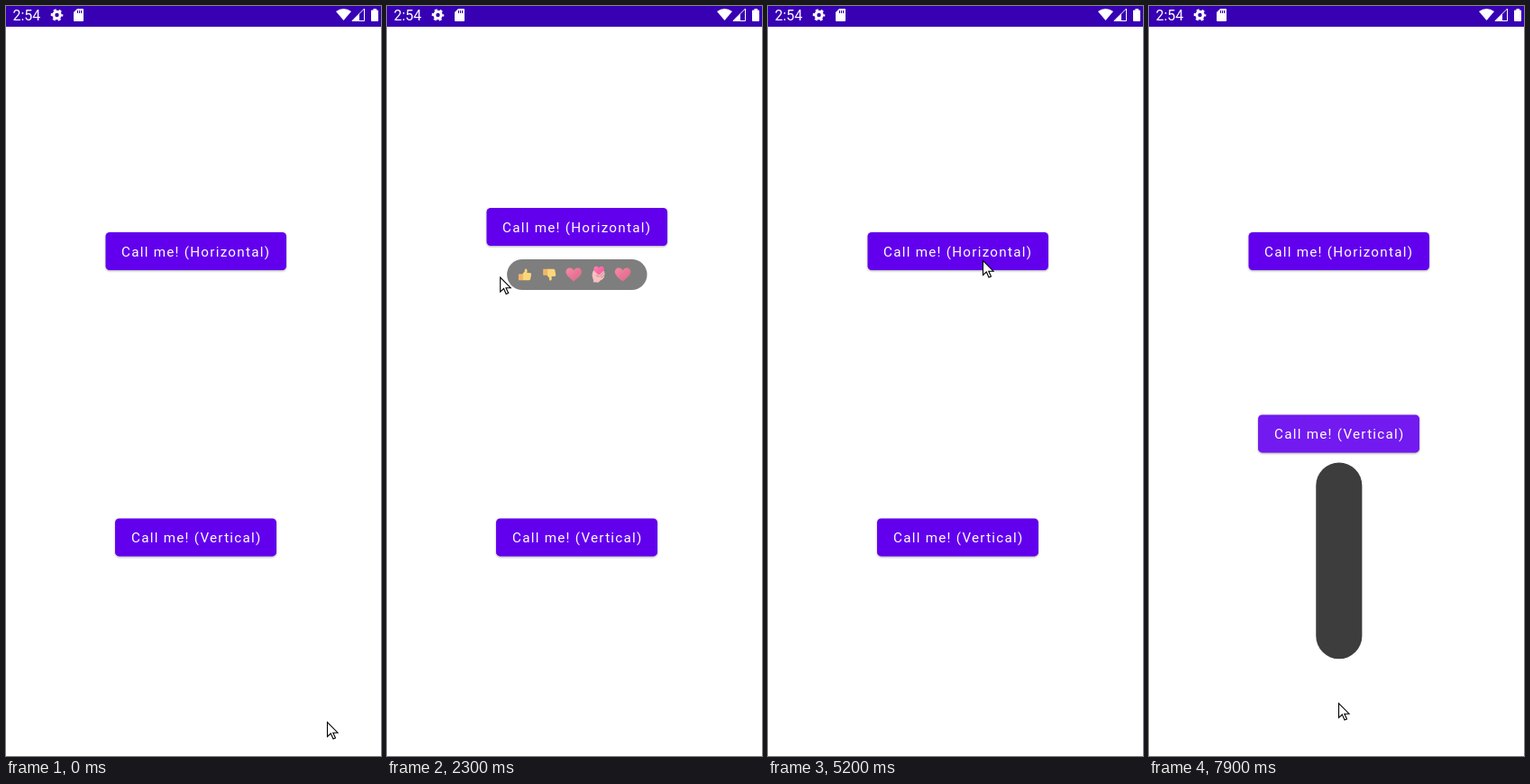
Write an HTML page that moves like this. It is 416 px wide and 832 px high and loops after 8 s.

```html
<!DOCTYPE html>
<html lang="en">
<head>
<meta charset="utf-8">
<style>
  html, body { margin: 0; width: 100%; height: 100%; overflow: hidden; background: #fff; }
  svg { display: block; width: 100%; height: 100%; }
  text { font-family: Roboto, sans-serif; fill: #fff; white-space: pre; }
  .label { font-size: 15.2px; letter-spacing: 1.27px; }
  .button { fill: #6200ee; filter: drop-shadow(0 1.5px 1.2px #0005); }
</style>
</head>
<body>
<svg viewBox="0 0 416 832">
  <defs>
    <linearGradient id="rose" x1="0" y1="0" x2="1" y2="1">
      <stop offset="0" stop-color="#f04a70"/>
      <stop offset=".5" stop-color="#de2559"/>
      <stop offset="1" stop-color="#b51548"/>
    </linearGradient>
    <g id="thumb">
      <path fill="#f28a0c" d="M-11 0Q-11-1-10-1H-4V10H-10Q-11 10-11 9Z"/>
      <path fill="#fcbf29" d="M-4-1 0-6V-9Q1-11 3-10Q5-9 4-3H9Q12-3 11.5 0L10 8Q9.500 10 7 10H-4Z"/>
    </g>
    <g id="thumbDown"><use href="#thumb" transform="scale(1 -1)"/></g>
    <path id="heart" fill="url(#rose)" d="M0 12C-6 7-14 2-14-5C-14-9-11-12-7-12C-4-12-1-10 0-7C1-10 4-12 7-12C11-12 14-9 14-5C14 2 6 7 0 12Z"/>
    <g id="handHeart">
      <path fill="#f59c9c" d="M-11 1Q-11-5-8-8L-3-5 5-3 9-7Q12-5 11 1Q10 8 4 10L0 14-9 13Q-8 9-10 6Z"/>
      <path fill="none" stroke="#4b2530" d="M-4 1 2 4M10-4Q7 0 3 2M11 0Q8 4 4 5"/>
      <use href="#heart" transform="translate(1 -7) scale(.65)" style="filter:saturate(1.6) brightness(1.2)"/>
    </g>
  </defs>

  <rect width="416" height="832" fill="#fff"/>
  <rect width="416" height="23" fill="#3700b3"/>
  <text x="7.500" y="16" font-size="16">2:54</text>
  <g fill="#fff">
    <circle cx="56.500" cy="10" r="3.700" fill="none" stroke="#fff" stroke-width="3"/>
    <circle cx="56.500" cy="10" r="5.600" fill="none" stroke="#fff" stroke-width="2.400" stroke-dasharray="2.930" stroke-dashoffset="1.460"/>
    <path d="M75 7 79 3H85Q86 3 86 4V16Q86 17 85 17H76Q75 17 75 16Z"/>
    <path stroke="#3700b3" d="M79.500 5v3M81.500 5v3M83.500 5v3"/>
    <path d="M366 6Q374.500 0 383 6L374.500 16Z"/>
    <path d="M384 16.500 397.500 3V16.500Z" fill="none" stroke="#fff"/>
    <path d="M384 16.500 392 8.500V16.500Z"/>
    <path d="M407.500 3H411V4.500H412Q413 4.500 413 5.500V16Q413 17 412 17H406Q405 17 405 16V5.500Q405 4.500 406 4.500H407.500Z"/>
  </g>
  <g id="scene"></g>
  <path id="cursor" fill="#fff" stroke="#000" stroke-width="1.100" d="M.5.5V16.500L4.300 13 7 19 9.500 18 6.800 12.200H12Z"/>
</svg>
<script>
const LOOP = 8000, FRAME = 100;
const SLOT = 32, GAP = 11.4;
const ICONS = ['thumb', 'thumbDown', 'heart', 'handHeart', 'heart'];
const scene = document.getElementById('scene');
const cursor = document.getElementById('cursor');

// Pointer stops: time, x, y
const POINTER = [
  [0, 356, 794], [700, 240, 278], [980, 240, 278], [1220, 250, 604], [1500, 255, 247],
  [2050, 122, 297], [2250, 122, 297], [2700, 215, 400], [3050, 242, 288], [3250, 242, 288],
  [3650, 225, 436], [4250, 160, 293], [4450, 160, 293], [4800, 200, 575], [5150, 238, 282],
  [5550, 238, 282], [5800, 250, 378], [6250, 298, 298], [6400, 298, 298], [7100, 252, 606],
  [7400, 210, 592], [7700, 210, 592], [7900, 210, 773]
];

const clamp = v => Math.max(0, Math.min(1, v));
const mix = (a, b, k) => a + (b - a) * k;
const smooth = k => k * k * (3 - 2 * k);
const spring = ms => ms <= 0 ? 0 : 1 - (1 + .026 * ms) * Math.exp(-.026 * ms);

// Cubic Bezier (.4, 0, .2, 1), solved by bisection
function standardEase(x) {
  let lo = 0, hi = 1;
  for (let i = 0; i < 20; i++) {
    const s = (lo + hi) / 2, r = 1 - s;
    if (1.2 * r * r * s + .6 * r * s * s + s ** 3 < x) lo = s; else hi = s;
  }
  return 3 * (1 - lo) * lo * lo + lo ** 3;
}

function element(tag, attrs, parent) {
  const node = document.createElementNS('http://www.w3.org/2000/svg', tag);
  set(node, attrs);
  return parent.appendChild(node);
}
function set(node, attrs) {
  for (const name in attrs) node.setAttribute(name, attrs[name]);
}

function makeMenu({ name, x, y, width, textX, vertical, presses }) {
  const panelW = vertical ? 54 : 248, panelH = vertical ? 230 : 54;
  const clip = element('clipPath', { id: name }, scene);
  element('rect', { x, y, width, height: 42, rx: 4.5 }, clip);
  const button = element('g', {}, scene);
  element('rect', { class: 'button', x, y, width, height: 42, rx: 4.5 }, button);
  const clipped = element('g', { 'clip-path': `url(#${name})` }, button);
  const ripple = element('circle', { fill: '#fff' }, clipped);
  element('text', { class: 'label', x: textX, y: y + 26.5 }, button).textContent = `Call me! (${name})`;
  const panel = element('g', {}, scene);
  element('rect', {
    x: -panelW / 2, y: -panelH / 2, width: panelW, height: panelH, rx: 27, fill: '#333'
  }, panel);
  const icons = ICONS.map(id => element('use', { href: '#' + id }, panel));
  const lift = panelH / 2;
  const center = [210.8, y - lift + 47 + panelH / 2];

  return time => {
    const press = presses.findLast(p => time >= p.down);
    const since = press ? time - press.open : -1;
    const closing = press ? time - press.close : -1;
    const shown = since >= 0 && closing < 250;
    set(button, { transform: `translate(0 ${shown ? -lift : 0})` });

    const held = press ? time - press.down : 1e4;
    const grow = smooth(clamp(held / 225));
    set(ripple, {
      cx: mix(press ? press.x : 0, x + width / 2, grow),
      cy: mix(y + 34, y + 21, grow),
      r: mix(62, 114, grow),
      opacity: .1 * clamp((held + 50) / 75) * (1 - clamp((held - 380) / 200))
    });

    set(panel, { display: shown ? 'inline' : 'none' });
    if (!shown) return;
    const visible = closing > 0 ? 1 - spring(closing) : spring(since);
    set(panel, { transform: `translate(${center}) scale(${visible})`, opacity: visible });

    const sizes = ICONS.map((_, i) => standardEase(clamp((since - 170 - 60 * i) / 450)));
    let at = -sizes.reduce((sum, s) => sum + s * SLOT + GAP, 0) / 2;
    icons.forEach((icon, i) => {
      const middle = at + sizes[i] * SLOT / 2;
      const place = vertical ? [0, middle] : [middle, 0];
      set(icon, { transform: `translate(${place}) scale(${sizes[i]})` });
      at += sizes[i] * SLOT + GAP;
    });
  };
}

const menus = [
  makeMenu({
    name: 'Horizontal', x: 110.5, y: 251, width: 200.5, textX: 128,
    presses: [
      { down: 820, open: 960, close: 2250, x: 240 },
      { down: 3090, open: 3290, close: 4450, x: 240 },
      { down: 5400, open: 5600, close: 6400, x: 238 }
    ]
  }),
  makeMenu({
    name: 'Vertical', x: 121, y: 568.4, width: 179, textX: 139, vertical: true,
    presses: [{ down: 7540, open: 7720, close: LOOP * 2, x: 210 }]
  })
];

function pointerAt(time) {
  const next = POINTER.findIndex(p => p[0] > time);
  if (next < 0) return POINTER.at(-1).slice(1);
  const [t0, x0, y0] = POINTER[next - 1], [t1, x1, y1] = POINTER[next];
  const k = smooth((time - t0) / (t1 - t0));
  return [mix(x0, x1, k), mix(y0, y1, k)];
}

function draw(now) {
  const time = Math.floor(now % LOOP / FRAME) * FRAME;
  menus.forEach(update => update(time));
  set(cursor, { transform: `translate(${pointerAt(time)})` });
}

const start = performance.now();
function tick() {
  draw(performance.now() - start);
  requestAnimationFrame(tick);
}
tick();
</script>
</body>
</html>
```
